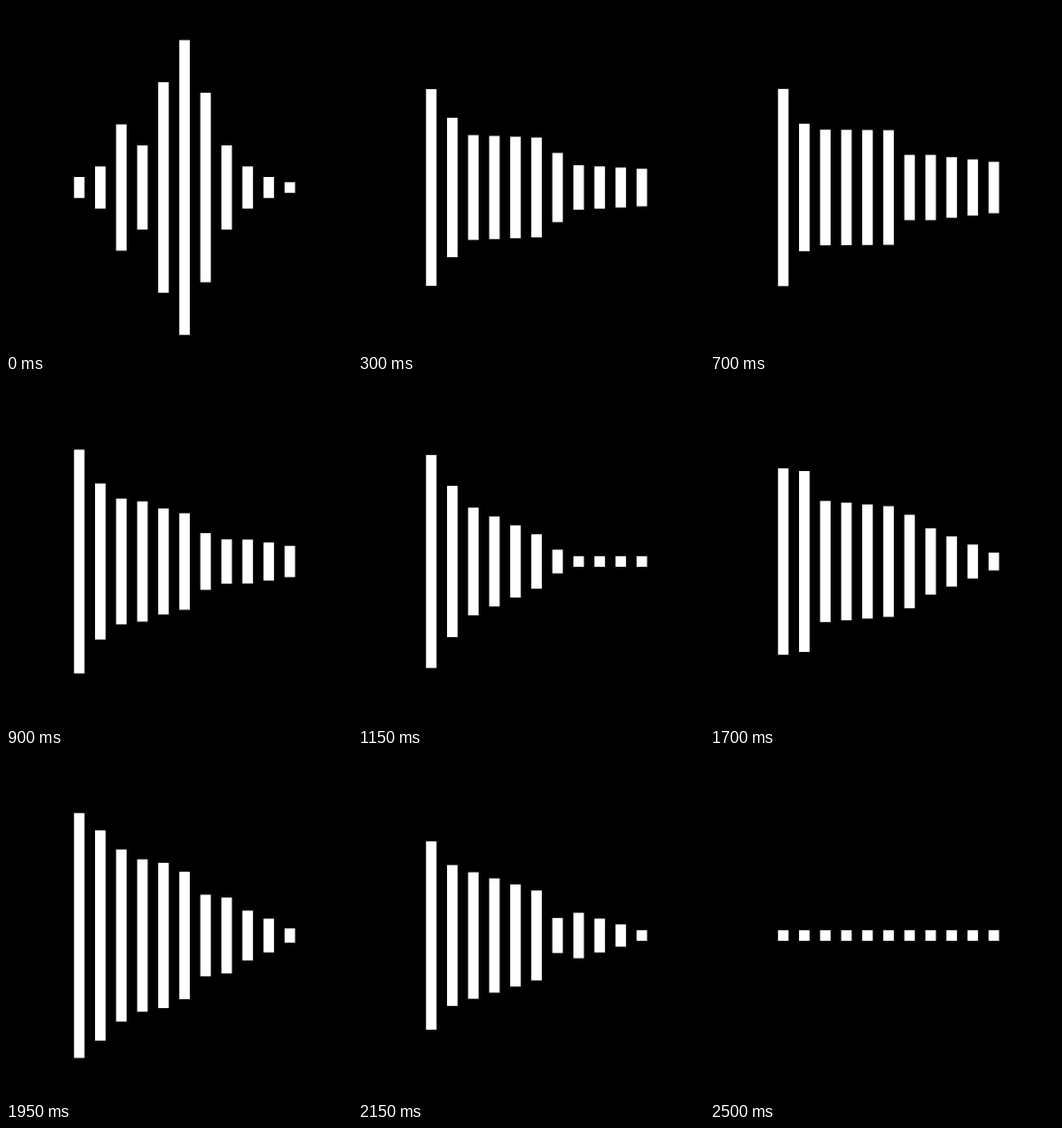
Write an HTML page that moves like this. It is 350x350 px and loops after 2550 ms.

```html
<!DOCTYPE html>
<html lang="en">
<head>
<meta charset="utf-8">
<title>Voice bars</title>
<style>
  html, body { margin: 0; width: 100%; height: 100%; overflow: hidden; background: #000; }
  svg { display: block; width: 100vw; height: 100vh; }
</style>
</head>
<body>
<svg viewBox="0 0 350 350">
  <rect width="350" height="350" fill="#000"/>
  <g id="bars" fill="#fff"></g>
</svg>
<script>
const LOOP = 2550, STEP = 50, UNIT = 10.65, CX = 180.6, CY = 183.6;

const lerp = (a, b, p) => a + (b - a) * p;

// The resting emblem, in units
const emblem = [2, 4, 12, 8, 20, 28, 18, 8, 4, 2, 1].map(n => n * UNIT);
const silence = emblem.map(() => UNIT);

// A spectrum is bent at these bars and straight between them
const bends = [0, 1, 2, 5, 6, 7, 10];
function spectrum(...points) {
  return emblem.map((_, i) => {
    const k = Math.max(1, bends.findIndex(b => b >= i));
    return lerp(points[k - 1], points[k], (i - bends[k - 1]) / (bends[k] - bends[k - 1]));
  });
}

// Time in ms, bass swell on the way there, easing power, bar heights
const poses = [
  { at: 50, bars: emblem },
  { at: 300, swell: 0, power: 0.6, bars: spectrum(199, 141, 106, 101, 70, 45, 38) },
  { at: 700, swell: 10, power: 1, bars: spectrum(199.5, 129, 117, 116, 66, 66, 52) },
  { at: 1150, swell: 20, power: 1, bars: spectrum(215.5, 153, 109, 55, 24, UNIT, UNIT) },
  { at: 1700, swell: 10, power: 1, bars: spectrum(188.5, 183, 122.5, 112, 94.5, 67, 18) },
  { at: 2150, swell: 59, power: 1, bars: spectrum(190.5, 142.5, 128, 91, 35.5, 46, UNIT) },
  { at: 2500, swell: 50, power: 2, bars: silence }
];

const group = document.getElementById('bars');
const rects = emblem.map((_, i) => {
  const rect = document.createElementNS('http://www.w3.org/2000/svg', 'rect');
  rect.setAttribute('x', CX + (i - 5) * 2 * UNIT - UNIT / 2);
  rect.setAttribute('width', UNIT);
  return group.appendChild(rect);
});

function height(i, t) {
  const k = Math.max(1, poses.findIndex(pose => pose.at >= t));
  const from = poses[k - 1], to = poses[k];
  const p = Math.max(0, (t - from.at) / (to.at - from.at));
  const arc = Math.sin(Math.PI * p);
  const swell = to.swell * arc * (1 - i / 10);
  const flutter = 1 + 0.008 * i * arc * Math.sin(t / 47 + i * 2.4);
  const base = lerp(from.bars[i], to.bars[i], p ** to.power);
  return Math.max(UNIT, (base + swell) * flutter);
}

function draw(now) {
  const t = Math.floor((now % LOOP) / STEP) * STEP;
  rects.forEach((rect, i) => {
    const h = height(i, t);
    rect.setAttribute('y', CY - h / 2);
    rect.setAttribute('height', h);
  });
}

function tick() {
  draw(performance.now());
  requestAnimationFrame(tick);
}
tick();
</script>
</body>
</html>
```
